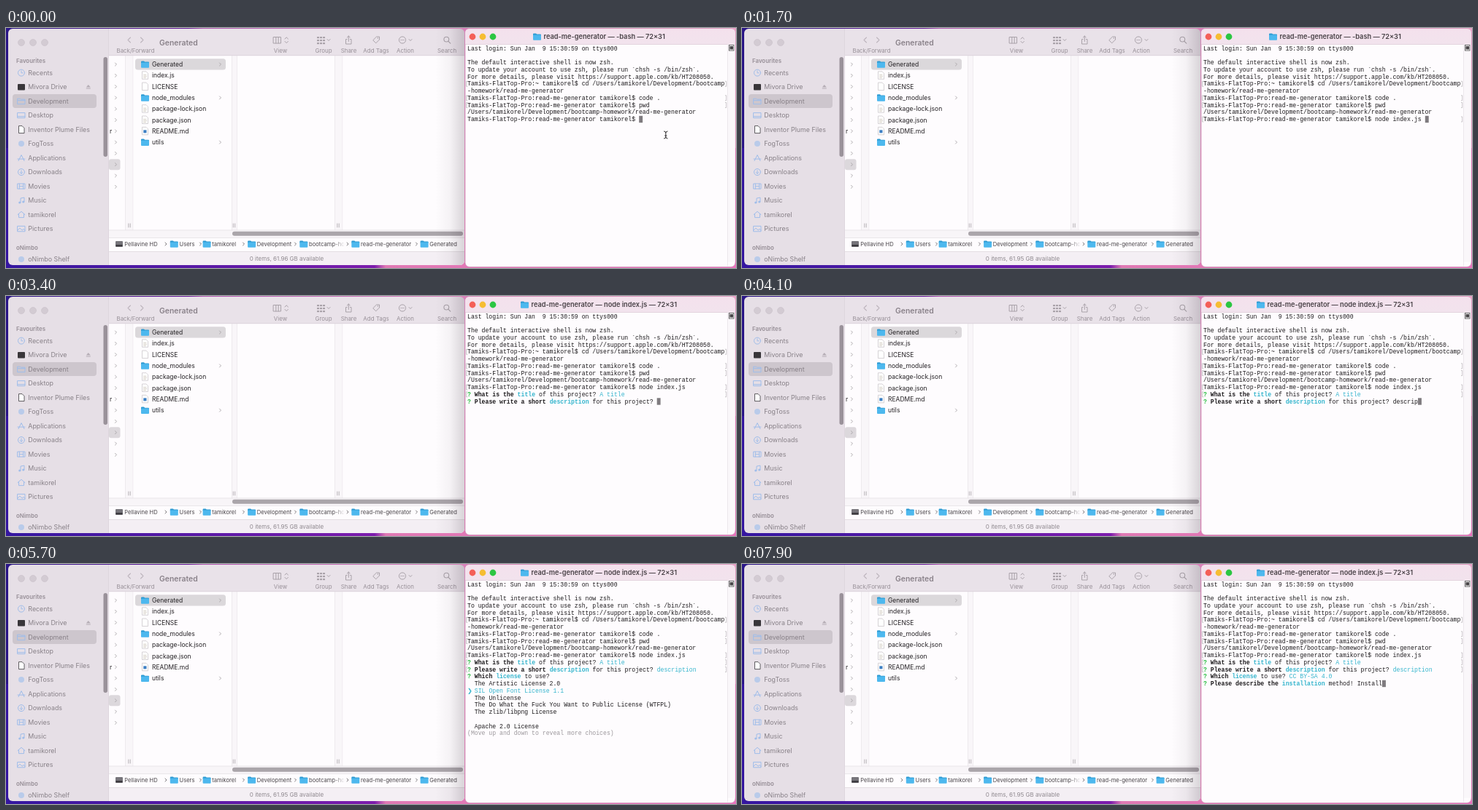
An HTML page that plays this animation: 1000x330 px, repeating every 8 s.

```html
<!DOCTYPE html>
<html lang="en">
<head>
<meta charset="utf-8">
<title>Terminal and file browser</title>
<style>
html, body { margin: 0; width: 100%; height: 100%; overflow: hidden; background: #e79cc6; }
svg { display: block; width: 1000px; height: 330px; }
text { font-family: Inter, Roboto, sans-serif; white-space: pre; }
.term text { font-family: "Liberation Mono", "Noto Sans Mono", monospace; font-size: 8.17px; }
</style>
</head>
<body>
<svg id="stage" viewBox="0 0 1000 330" xmlns="http://www.w3.org/2000/svg">
  <defs>
    <linearGradient id="topWall"><stop offset="0" stop-color="#2a1687"/><stop offset=".25" stop-color="#6a1c9c"/><stop offset=".27" stop-color="#b45ab4"/><stop offset=".7" stop-color="#e08abb"/><stop offset="1" stop-color="#e9a3c8"/></linearGradient>
    <linearGradient id="lowWall"><stop offset="0" stop-color="#3416a0"/><stop offset=".505" stop-color="#7c1cac"/><stop offset=".52" stop-color="#e07ab4"/><stop offset="1" stop-color="#e873bd"/></linearGradient>
    <linearGradient id="bar" x2="0" y2="1"><stop offset="0" stop-color="#f4e1ed"/><stop offset="1" stop-color="#f2e3ed"/></linearGradient>
    <linearGradient id="fade"><stop stop-color="#fefcfe" stop-opacity="0"/><stop offset="1" stop-color="#fefcfe"/></linearGradient>
    <linearGradient id="shade"><stop stop-color="#201020" stop-opacity="0"/><stop offset=".5" stop-color="#201020" stop-opacity=".04"/><stop offset="1" stop-color="#201020" stop-opacity=".17"/></linearGradient>
    <clipPath id="finderClip"><rect x="3" y="1" width="625" height="325" rx="6"/></clipPath>
  </defs>
  <rect width="1000" height="165" fill="url(#topWall)"/>
  <rect y="165" width="1000" height="165" fill="url(#lowWall)"/>
  <g id="finder" clip-path="url(#finderClip)"></g>
  <g id="window"></g>
  <g id="screen" class="term"></g>
</svg>
<script>
const LOOP = 8000;
const USER = "tamikorel";
const HOST = "Tamiks-FlatTop-Pro";
const $ = id => document.getElementById(id);

const rect = (x, y, w, h, fill, more = "") => `<rect x="${x}" y="${y}" width="${w}" height="${h}" fill="${fill}" ${more}/>`;
const dot = (x, y, r, fill, more = "") => `<circle cx="${x}" cy="${y}" r="${r}" fill="${fill}" ${more}/>`;
const line = (d, color, w = 1) => `<path d="${d}" fill="none" stroke="${color}" stroke-width="${w}" stroke-linecap="round" stroke-linejoin="round"/>`;
const text = (x, y, s, size, fill, more = "") => `<text x="${x}" y="${y}" font-size="${size}" fill="${fill}" ${more}>${s}</text>`;
const chevron = (x, y, color = "#a9a4a8") => line(`M${x - 1},${y - 2}l2,2l-2,2`, color, .9);
const down = (x, y) => line(`M${x - 2},${y - 1}l2,2l2,-2`, "#a9a2a9");
const folder = (x, y) =>
  `<path d="M${x},${y - 3.6}q0,-1 1,-1h3l1.2,1.2h4.8q1,0 1,1v1h-11z" fill="#2c9ad2"/>` +
  rect(x, y - 2.6, 11, 7.4, "#4db8ee", 'rx="1"');
const page = (x, y) => `<path d="M${x},${y - 5.5}h5.5l2.5,2.5v8h-8z" fill="#fff" stroke="#c4c0c4" stroke-width=".7"/>`;

const BLUE = "#9fbdea";
const sideIcon = {
  clock: y => line(`M25.5,${y}a4.5,4.5 0 1 0 -9,0a4.5,4.5 0 1 0 9,0M21,${y - 2.6}v2.8h2`, BLUE),
  square: y => rect(16, y - 4, 10, 8.5, "#39363a", 'rx="1"'),
  folder: y => line(`M16,${y - 3.5}h3.5l1,1h5.5v6.5h-10zM16,${y - 1}h10`, BLUE),
  screen: y => line(`M16,${y - 3.5}h10v7h-10zM16,${y + 1.5}h10`, BLUE),
  page: y => `<path d="M17.5,${y - 5}h4.5l3,3v7h-7.5z" fill="#fff" stroke="#39363a" stroke-width=".8"/>`,
  circle: y => dot(21, y, 4, "#b9cbea"),
  tools: y => line(`M17,${y + 4}l4,-8l4,8M16,${y + 1.5}h10`, BLUE),
  arrow: y => line(`M25.5,${y}a4.5,4.5 0 1 0 -9,0a4.5,4.5 0 1 0 9,0M21,${y - 2.2}v4.4m-1.8,-1.8l1.8,1.8l1.8,-1.8`, BLUE),
  film: y => line(`M16,${y - 3.5}h10v7h-10zM18.3,${y - 3.5}v7M23.7,${y - 3.5}v7M18.3,${y}h5.4`, BLUE),
  note: y => line(`M20,${y + 3}v-6l5,-1v6`, BLUE) + dot(18.7, y + 3, 1.5, BLUE) + dot(23.7, y + 2, 1.5, BLUE),
  home: y => line(`M16,${y}l5,-4.3l5,4.3M17.5,${y - 1}v5h7v-5`, BLUE),
  photo: y => line(`M16,${y - 3.7}h10v7.4h-10zM16,${y + 2}l3,-3l3,3l2,-1.6l2,1.6`, BLUE)
};

function sidebar() {
  const items = [["clock", "Recents"], ["square", "Mivora Drive"], ["folder", "Development"],
    ["screen", "Desktop"], ["page", "Inventor Plume Files"], ["circle", "FogToss"],
    ["tools", "Applications"], ["arrow", "Downloads"], ["film", "Movies"], ["note", "Music"],
    ["home", USER], ["photo", "Pictures"]];
  const ink = "#888188", head = 'font-weight="600"';
  let s = rect(3, 1, 138, 325, "#e6dfe6") + rect(9, 91, 115, 19, "#cdc6cd", 'rx="4"');
  for (const x of [21, 37, 53]) s += dot(x, 20, 4.5, "#d3cbd3", 'stroke="#c8c0c8" stroke-width=".6"');
  s += text(14, 48, "Favourites", 7.9, "#968e96", head);
  items.forEach(([icon, name], i) => {
    const y = 61.6 + 19.5 * i;
    s += sideIcon[icon](y) + text(30.3, y + 3.2, name, 8.9, ink);
  });
  s += `<path d="M109.8,81.5l3,-3.4l3,3.4z" fill="#b5adb5"/>` + rect(109.8, 82.6, 6, 1, "#b5adb5");
  s += text(14, 305, "oNimbo", 7.9, "#968e96", head);
  s += sideIcon.circle(318) + text(30.3, 321, "oNimbo Shelf", 8.9, ink);
  return s + rect(133.5, 40, 5.5, 137, "#9a929a", 'rx="2.7"') + rect(140.5, 1, .7, 325, "#d6ced6");
}

function toolbar() {
  const g = "#a9a2a9";
  let s = rect(141, 1, 487, 37, "#e9e2e9") + rect(141, 37.4, 487, .8, "#d9d1d9");
  s += line("M170.5,13l-3.5,3.5l3.5,3.5M184.5,13l3.5,3.5l-3.5,3.5", "#bdb6bd", 1.1);
  s += text(210, 23.8, "Generated", 10.4, "#8a828a", 'font-weight="600"');
  s += line("M366.5,12.5h10v8.5h-10zM369.8,12.5v8.5M373.2,12.5v8.5", g);
  s += line("M382,15l2.2,-2.2l2.2,2.2M382,18.4l2.2,2.2l2.2,-2.2", g);
  for (const y of [12, 16, 20]) for (const x of [426, 430, 434]) s += rect(x, y, 3, 2.2, g);
  s += down(442, 16.5);
  s += line("M467,15.5h-1.5v6.5h7.5v-6.5h-1.5M469.3,18.5v-7.5m-2,2l2,-2l2,2", g);
  s += line("M503,16.5l4.5,-4.5h4v4l-4.5,4.5z", g) + dot(509.3, 14, .8, g);
  s += dot(543, 16.5, 4.6, "none", `stroke="${g}"`);
  for (const x of [541, 543, 545]) s += dot(x, 16.5, .7, g);
  s += down(554, 16.5);
  s += dot(603.3, 15.6, 3.4, "none", `stroke="${g}" stroke-width="1.1"`) + line("M605.8,18.2l3,3", g, 1.2);
  const labels = [[177.5, "Back/Forward"], [376, "View"], [435, "Group"], [469.5, "Share"],
    [507, "Add Tags"], [547, "Action"], [604, "Search"]];
  for (const [x, name] of labels) s += text(x, 34, name, 7.9, "#989098", 'text-anchor="middle"');
  return s;
}

function columns() {
  const files = ["Generated/", "index.js", "LICENSE", "node_modules/", "package-lock.json", "package.json", "README.md", "utils/"];
  const rowY = i => 50 + 15.3 * i;
  let s = rect(141, 38, 487, 288, "#fefcfe");
  for (const [x, w] of [[163, 10.5], [309, 7], [450, 10.5]])
    s += rect(x, 38, w, 240, "#f9f6f9") + rect(x, 38, .7, 240, "#e9e5e9") + rect(x + w, 38, .7, 240, "#e9e5e9");
  for (const x of [169, 312.5, 455]) s += line(`M${x - 1.2},269v5M${x + 1.2},269v5`, "#a7a2a7", .8);
  s += rect(141, 180.2, 15.5, 15, "#dcd8dc", 'rx="3"') + rect(177, 42.2, 124, 15.3, "#dbd8db", 'rx="3.5"');
  for (let i = 0; i < 12; i++) s += chevron(150.5, rowY(i));
  s += text(142, rowY(6) + 3, "r", 8.6, "#2a272a");
  files.forEach((name, i) => {
    const y = rowY(i), isDir = name.endsWith("/");
    s += isDir ? folder(185, y) + chevron(293.5, y) : page(186.5, y);
    if (name === "README.md") s += rect(188.3, y - 1.5, 4.2, 4, "#3d7fc4");
    else if (!isDir && i !== 2) s += line(`M188.5,${y - 1}h3.5M188.5,${y + 1}h4M188.5,${y + 3}h3`, "#c5bcae", .7);
    s += text(200, y + 3.1, name.replace("/", ""), 8.5, "#242124");
  });
  return s;
}

function footer() {
  let s = rect(141, 278, 487, 10, "#f8f5f8") + rect(141, 277.6, 487, .7, "#e2dde2") + rect(310, 279.8, 316, 6, "#aaa5aa", 'rx="3"');
  s += rect(141, 288, 487, 19, "#fefcfe") + rect(141, 288, 487, .7, "#e2dde2");
  s += rect(150, 293, 10, 8, "#77757b", 'rx="1"') + rect(150.5, 298, 9, 2.4, "#3d3b40");
  const path = [[162.3, "Pellavine HD", 219], [237.5, "Users", 266.5], [282.3, USER, 325.5], [343.8, "Development", 396.5],
    [415, "bootcamp-ho", 468], [486, "read-me-generator", 562.5], [580.3, "Generated", 0]];
  path.forEach(([x, name, next], i) => {
    if (i) s += folder(x - 12.7, 297);
    s += text(x, 299.9, name, 7.6, "#4a464a");
    if (i === 4) s += rect(449, 291, 15, 13, "url(#fade)");
    if (next) s += chevron(next, 297, "#6f6a6f");
  });
  s += rect(141, 307, 487, 19, "#f4eff4") + rect(141, 307, 487, .7, "#ddd7dc");
  return s + `<text id="space" x="384.5" y="320" font-size="8" fill="#8f898f" text-anchor="middle"></text>`;
}

function terminalWindow() {
  let s = rect(629, 1, 370, 327.5, "#fefcfe", 'rx="6" stroke="#c78fb0" stroke-width=".6"');
  s += `<path d="M629,22.5v-15.5q0,-6 6,-6h358q6,0 6,6v15.5z" fill="url(#bar)"/>` + rect(629, 22, 370, .7, "#dcc9d5");
  [[639, "#f45f58"], [653, "#f6bd32"], [667, "#2cc642"]].forEach(([x, c]) => s += dot(x, 12, 4.4, c));
  s += `<g id="icon">${folder(0, 12)}</g><text id="title" y="15.2" font-size="9.2" font-weight="600" fill="#484146"></text>`;
  s += rect(988, 22.5, 10.7, 299, "#faf7fa") + rect(988, 22.5, .7, 305, "#e5e0e5");
  return s + rect(990.5, 23.5, 6.5, 7.5, "#fff", 'stroke="#4a474a" stroke-width=".8"') + rect(991.5, 25, 4.5, 4.5, "#4a474a");
}

// Terminal grid: 72 columns starting at x = 632
const CELL = 4.9, ROW = 9.74;
const colX = c => 632 + c * CELL;
const rowY = r => 28 + r * ROW;
const INK = "#1c1a1c", CYAN = "#35b5cd", GREEN = "#2fbf46", GREY = "#9c989c";
const BOLD = 'font-weight="700"';
const cells = (r, c, s, fill = INK, more = "") =>
  s.trim() ? `<text x="${colX(c)}" y="${rowY(r) + 2.7}" fill="${fill}" ${more}>${s}</text>` : "";
const cursor = (r, c) => rect(colX(c), rowY(r) - 4.6, CELL, 9.4, "#7f7b7f");
const marks = r => line(`M632,${rowY(r) - 3.4}h-1.5v7h1.5M985.4,${rowY(r) - 3.4}h1.3v7h-1.3`, "#b5b1b5", .7);

const PROMPT = `${HOST}:read-me-generator ${USER}$ `;
const HISTORY = ["Last login: Sun Jan  9 15:30:59 on ttys000", "",
  "The default interactive shell is now zsh.",
  "To update your account to use zsh, please run `chsh -s /bin/zsh`.",
  "For more details, please visit https://support.apple.com/kb/HT208050.",
  `${HOST}:~ ${USER}$ cd /Users/${USER}/Development/bootcamp`,
  "-homework/read-me-generator", PROMPT + "code .", PROMPT + "pwd",
  `/Users/${USER}/Development/bootcamp-homework/read-me-generator`];
const LICENSES = ["", "Apache 2.0 License", "Boost Software License 1.0", "BSD 3-Clause License",
  "BSD 2-Clause License", "CC0-1.0", "CC BY 4.0", "CC BY-SA 4.0", "CC BY-NC 4.0", "CC BY-ND 4.0",
  "BY-NC-SA 4.0", "The Artistic License 2.0", "SIL Open Font License 1.1", "The Unlicense",
  "The Do What the Fuck You Want to Public License (WTFPL)", "The zlib/libpng License"];

const ticks = (t, start) => Math.max(0, Math.floor((t - start) / 100) + 1);
const typed = (s, t, start) => s.slice(0, ticks(t, start));

function question(r, lead, key, rest, answer, state) {
  const keyCol = 2 + lead.length, restCol = keyCol + key.length, end = restCol + rest.length;
  return cells(r, 0, "?", GREEN, BOLD) + cells(r, 2, lead, INK, BOLD) + cells(r, keyCol, key, CYAN, BOLD) +
    cells(r, restCol, rest) + cells(r, end, answer, state === "done" ? CYAN : state === "hint" ? GREY : INK) +
    (state === "typing" ? cursor(r, end + answer.length) : "");
}

// The highlight sinks to the fourth line at most; after that the list itself scrolls.
function licenseList(t) {
  const first = t >= 5000 ? 1 : 0;
  const ups = Math.min(5, ticks(t, 5200)), downs = Math.min(11, 2 * ticks(t, 5800));
  const active = first - ups + downs, slot = Math.min(3, first + downs), n = LICENSES.length;
  let s = "";
  for (let i = 0; i < 7; i++) {
    const on = i === slot, r = 14 + i;
    if (on) s += cells(r, 0, "❯", CYAN);
    s += cells(r, 2, LICENSES[(active - slot + i + 2 * n) % n], on ? CYAN : INK);
  }
  return s + cells(21, 0, "(Move up and down to reveal more choices)", GREY);
}

const ENTER = { run: 1600, title: 3100, about: 4700, license: 6700 };

function screen(t) {
  const command = t >= 1400 ? "node index.js " : typed("node in", t, 500);
  let s = HISTORY.map((row, r) => cells(r, 0, row)).join("") + [5, 7, 8].map(marks).join("");
  s += cells(10, 0, PROMPT + command);
  if (t >= ENTER.run) s += marks(10);
  if (t < 2000) s += cursor(10, PROMPT.length + command.length);
  else {
    const done = t >= ENTER.title;
    s += question(11, "What is the ", "title", " of this project? ", typed("A title", t, 2300), done ? "done" : "typing");
  }
  if (t >= ENTER.title) {
    const done = t >= ENTER.about;
    s += marks(11) + question(12, "Please write a short ", "description", " for this project? ",
      typed("description", t, 3500), done ? "done" : "typing");
  }
  if (t >= ENTER.about) {
    const done = t >= ENTER.license;
    const answer = done ? "CC BY-SA 4.0" : t < 5000 ? "(Use arrow keys)" : "";
    s += marks(12) + question(13, "Which ", "license", " to use? ", answer, done ? "done" : "hint");
    if (!done) s += licenseList(t);
  }
  if (t >= ENTER.license)
    s += question(14, "Please describe the ", "installation", " method! ", typed("Install", t, 7300), "typing");
  if (t < 500) s += line("M901.5,142q2.3,0 2.3,2v6q0,2 -2.3,2M906.1,142q-2.3,0 -2.3,2M906.1,152q-2.3,0 -2.3,-2M902.6,148h2.4", INK, .9);
  return s;
}

let last = -1;
function draw(now) {
  const t = Math.floor((now % LOOP) / 100) * 100;
  if (t !== last) {
    last = t;
    const running = t >= 1900;
    $("screen").innerHTML = screen(t);
    $("title").textContent = `read-me-generator — ${running ? "node index.js" : "-bash"} — 72×31`;
    $("title").setAttribute("x", running ? 719.5 : 736.5);
    $("icon").setAttribute("transform", `translate(${running ? 705 : 722},0)`);
    $("space").textContent = `0 items, ${t < 800 ? "61.96" : "61.95"} GB available`;
  }
}

$("finder").innerHTML = sidebar() + columns() + toolbar() + footer() + rect(588, 1, 40, 325, "url(#shade)");
$("window").innerHTML = terminalWindow();
draw(0);
const start = performance.now();
requestAnimationFrame(function tick() {
  draw(performance.now() - start);
  requestAnimationFrame(tick);
});
</script>
</body>
</html>
```
